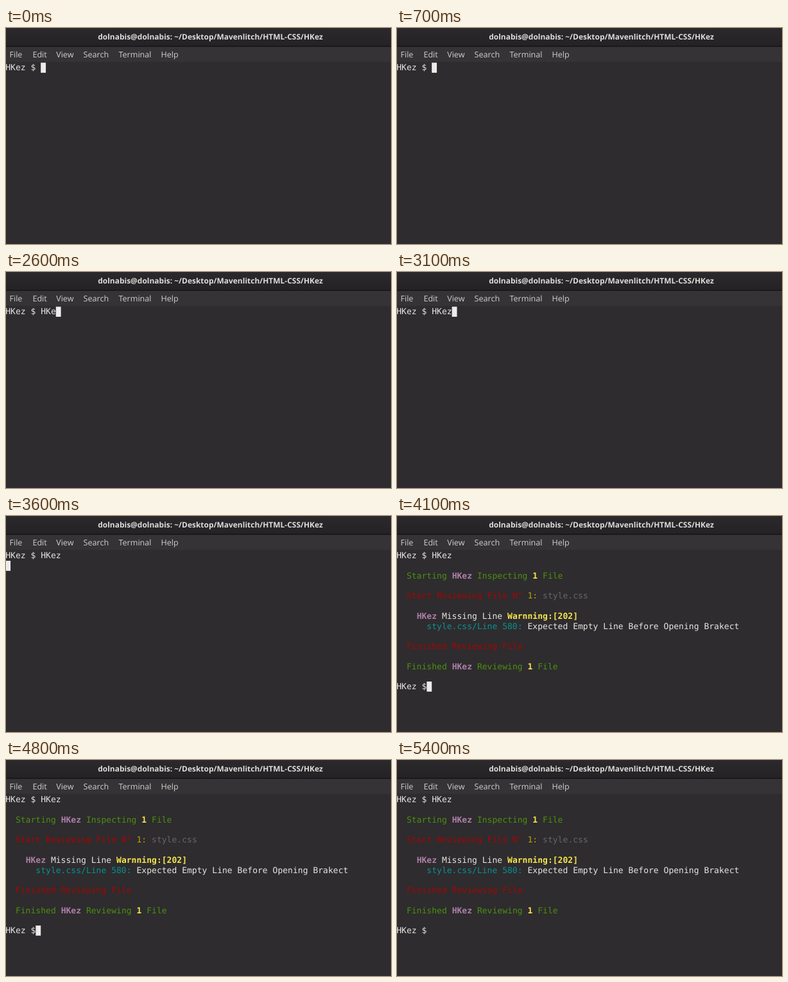
Recreate the animation shown at these times as an HTML page. Size 600 by 338 pixels, loop 5.8 s.

```html
<!DOCTYPE html>
<html lang="en">
<head>
<meta charset="utf-8">
<title>Terminal</title>
<style>
  html, body { margin: 0; width: 100%; height: 100%; overflow: hidden; background: #2e2c2e; }
  svg { display: block; width: 100%; height: 100%; }
  text { white-space: pre; text-rendering: geometricPrecision; }
  .title { font: 700 11.98px "Open Sans", sans-serif; fill: #dedcda; }
  .menu { font: 400 12.6px "Open Sans", sans-serif; fill: #d0cecc; }
  .term { font: 400 13.05px "DejaVu Sans Mono", monospace; }
  .bold { font-weight: 700; }
</style>
</head>
<body>
<svg id="stage" viewBox="0 0 600 338">
  <defs>
    <linearGradient id="bar" x2="0" y2="1">
      <stop offset="0" stop-color="#2b292b"/>
      <stop offset="1" stop-color="#242224"/>
    </linearGradient>
  </defs>
  <rect width="600" height="338" fill="#2e2c2e"/>
  <rect width="600" height="28" fill="url(#bar)"/>
  <rect y="28" width="600" height="1.5" fill="#121012"/>
  <rect y="29.5" width="600" height="23.5" fill="#353335"/>
  <text class="title" x="143.2" y="18.3">dolnabis@dolnabis: ~/Desktop/Mavenlitch/HTML-CSS/HKez</text>
  <g id="menu" class="menu"></g>
  <g id="term" class="term"></g>
</svg>
<script>
const LOOP = 5800;
const LEFT = -0.8, TOP = 54.3, CELL = 7.857, LINE = 15.75, ASCENT = 12.1;
const TOOL = 'HKez';
const WHITE = '#e6e4e2', GREEN = '#4b9010', RED = '#a80404', PINK = '#ad7fa8',
      YELLOW = '#f6e54e', GOLD = '#c0a008', GREY = '#696468', TEAL = '#0b9092';

const add = (parent, tag, attrs, content = '') => {
  const node = document.createElementNS('http://www.w3.org/2000/svg', tag);
  for (const key in attrs) node.setAttribute(key, attrs[key]);
  node.textContent = content;
  parent.appendChild(node);
  return node;
};
const byId = id => document.getElementById(id);
const colX = col => LEFT + col * CELL;
const rowY = row => TOP + row * LINE;

// Each part is [text, colour, bold?]; parts follow each other on the cell grid.
const writeRow = (parent, row, col, ...parts) => {
  for (const [content, fill, bold] of parts) {
    add(parent, 'text', {
      x: colX(col), y: rowY(row) + ASCENT, fill, class: bold ? 'bold' : ''
    }, content);
    col += content.length;
  }
};

const menu = { File: 5.5, Edit: 41.4, View: 78.2, Search: 120.6, Terminal: 175.4, Help: 241.4 };
for (const label in menu) add(byId('menu'), 'text', { x: menu[label], y: 46.3 }, label);

const term = byId('term');
writeRow(term, 0, 0, [TOOL + ' $', WHITE]);
const command = add(term, 'text', { x: colX(7), y: rowY(0) + ASCENT, fill: WHITE });

const output = add(term, 'g', {});
const tool = [TOOL, PINK, true], one = ['1', YELLOW, true];
writeRow(output, 2, 2, ['Starting ', GREEN], tool, [' Inspecting ', GREEN], one, [' File', GREEN]);
writeRow(output, 4, 2, ['Start Reviewing File N° ', RED], ['1: ', GOLD], ['style.css', GREY]);
writeRow(output, 6, 4, tool, [' Missing Line ', WHITE], ['Warnning:[202]', YELLOW, true]);
writeRow(output, 7, 6, ['style.css/Line 580: ', TEAL], ['Expected Empty Line Before Opening Brakect', WHITE]);
writeRow(output, 9, 2, ['Finished Reviewing File', RED]);
writeRow(output, 11, 2, ['Finished ', GREEN], tool, [' Reviewing ', GREEN], one, [' File', GREEN]);
writeRow(output, 13, 0, [TOOL + ' $', WHITE]);

const cursor = add(term, 'rect', { width: CELL, height: LINE, fill: '#eeecea' });

// [start ms, typed letters, cursor cell as [row, col] or null, output shown]
const steps = [
  [0, 0, [0, 7], false],
  [100, 0, null, false],
  [700, 0, [0, 7], false],
  [1700, 1, [0, 8], false],
  [2100, 2, [0, 9], false],
  [2600, 3, [0, 10], false],
  [3000, 4, [0, 11], false],
  [3600, 4, [1, 0], false],
  [4100, 4, [13, 6], true],
  [4200, 4, null, true],
  [4800, 4, [13, 6], true],
  [5400, 4, null, true]
];

let shown;
const draw = time => {
  const step = steps.findLast(([start]) => start <= time);
  if (step === shown) return;
  shown = step;
  const [, typed, cell, done] = step;
  command.textContent = TOOL.slice(0, typed);
  output.style.display = done ? '' : 'none';
  cursor.style.display = cell ? '' : 'none';
  if (cell) {
    cursor.setAttribute('x', colX(cell[1]));
    cursor.setAttribute('y', rowY(cell[0]));
  }
};

const begin = performance.now();
const tick = () => {
  draw((performance.now() - begin) % LOOP);
  requestAnimationFrame(tick);
};
tick();
</script>
</body>
</html>
```
